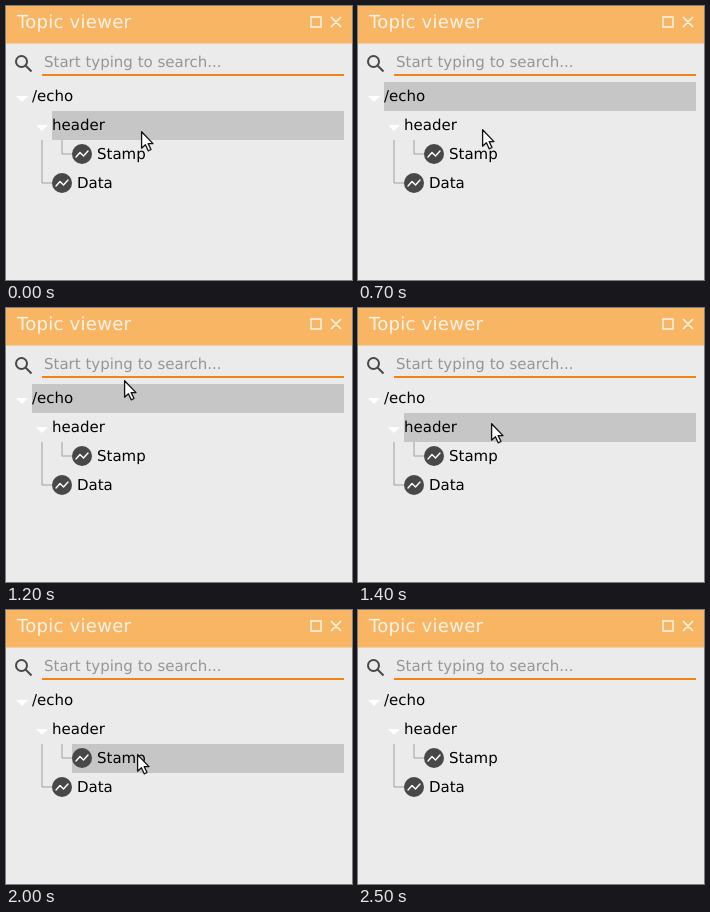
Recreate the animation shown at these times as an HTML page. Size 346 px wide and 274 px high, loop 2.9 s.

```html
<!DOCTYPE html>
<html lang="en">
<head>
<meta charset="utf-8">
<title>Topic viewer</title>
<style>
  html, body { margin: 0; width: 100%; height: 100%; overflow: hidden; background: #ebebeb; }
  svg { display: block; width: 346px; height: 274px; font: 15px "DejaVu Sans", sans-serif; }
  text { text-rendering: geometricPrecision; }
  .line { fill: none; }
</style>
</head>
<body>
<svg viewBox="0 0 346 274">
  <defs>
    <g id="plot">
      <circle r="10" fill="#484848"/>
      <path class="line" d="M-6 3L-2-1.5 1.5 2 6-3" stroke="#fff" stroke-width="1.4"
            stroke-linecap="round" stroke-linejoin="round"/>
    </g>
    <path id="fold" d="M0 0h12l-6 6z" fill="#fff"/>
  </defs>

  <rect width="346" height="274" fill="#ebebeb"/>
  <rect width="346" height="37.5" fill="#f8b664"/>
  <text x="11" y="22" font-size="18" letter-spacing=".27" fill="#fdf3e6">Topic viewer</text>
  <path class="line" stroke="#fdf6ec" stroke-width="1.5" d="M305 11h10v10h-10zM325 11l10 10m0-10l-10 10"/>

  <g class="line" stroke="#484848" stroke-width="2">
    <circle cx="15.5" cy="55.5" r="5.5"/>
    <path d="M19.5 59.5l6 6"/>
  </g>
  <text x="38" y="61" fill="#969696">Start typing to search...</text>
  <rect x="36" y="68" width="302" height="2" fill="#ef8418"/>

  <rect id="hover" height="29" fill="#c6c6c6"/>
  <path class="line" d="M36 134v43H46M56 134v14H66" stroke="#a0a0a0"/>
  <use href="#fold" x="10" y="90"/>
  <use href="#fold" x="30" y="119"/>
  <use href="#plot" x="76" y="148"/>
  <use href="#plot" x="56" y="177"/>
  <text x="26" y="95">/echo</text>
  <text x="46" y="124">header</text>
  <text x="91" y="153">Stamp</text>
  <text x="71" y="182">Data</text>

  <path id="arrow" d="M.6.8V17.2L4.4 13.8 7.2 19.8 10 18.5 7.2 12.6H12z"
        fill="#fff" stroke="#111" stroke-width="1.3" stroke-linejoin="round"/>
  <path id="beam" class="line" d="M-4-8h3l1 1 1-1h3M0-7V7M-4 8h3l1-1 1 1h3" stroke="#111" stroke-width="1.2"/>
</svg>
<script>
const LOOP = 2900, STEP = 100;
const INDENT = [26, 46, 66, 46];
const PAUSES = [2, 5]; // steps that repeat the one before
const LAST = 24;       // the pointer leaves after this step

// Turning points of the pointer: step, x, y, hovered row (-1 is none)
const path = [
  [0, 135, 125, 1], [1, 118, 91, 0], [3, 128, 141, 2], [4, 118, 113, 2],
  [6, 115, 92, 0], [9, 142, 186, 1], [12, 118, 72, 0], [14, 133, 115, 1],
  [17, 145, 185, 3], [18, 147, 188, 3], [22, 114, 99, 0], [23, 79, 55.5, -1],
  [LAST, 65, 20, -1]
];

const byId = id => document.getElementById(id);
const hover = byId("hover"), arrow = byId("arrow"), beam = byId("beam");

function show(el, visible) {
  el.setAttribute("visibility", visible ? "visible" : "hidden");
}

function pointerAt(step) {
  const next = Math.max(1, path.findIndex(key => key[0] >= step));
  const a = path[next - 1], b = path[next];
  const u = (step - a[0]) / (b[0] - a[0]);
  return a.map((from, i) => from + (b[i] - from) * u);
}

function draw(now) {
  let step = Math.floor(now % LOOP / STEP);
  if (PAUSES.includes(step)) step--;
  const inside = step <= LAST;
  const [, x, y, nearRow] = pointerAt(Math.min(step, LAST));
  const row = Math.round(nearRow);
  const overField = y > 38 && y < 68;

  show(hover, row >= 0);
  if (row >= 0) {
    hover.setAttribute("x", INDENT[row]);
    hover.setAttribute("y", 76 + 29 * row);
    hover.setAttribute("width", 338 - INDENT[row]);
  }
  show(arrow, inside && !overField);
  show(beam, inside && overField);
  for (const el of [arrow, beam]) {
    el.setAttribute("transform", `translate(${Math.round(x)} ${Math.round(y)})`);
  }
}

function tick() {
  draw(performance.now());
  requestAnimationFrame(tick);
}
tick();
</script>
</body>
</html>
```
